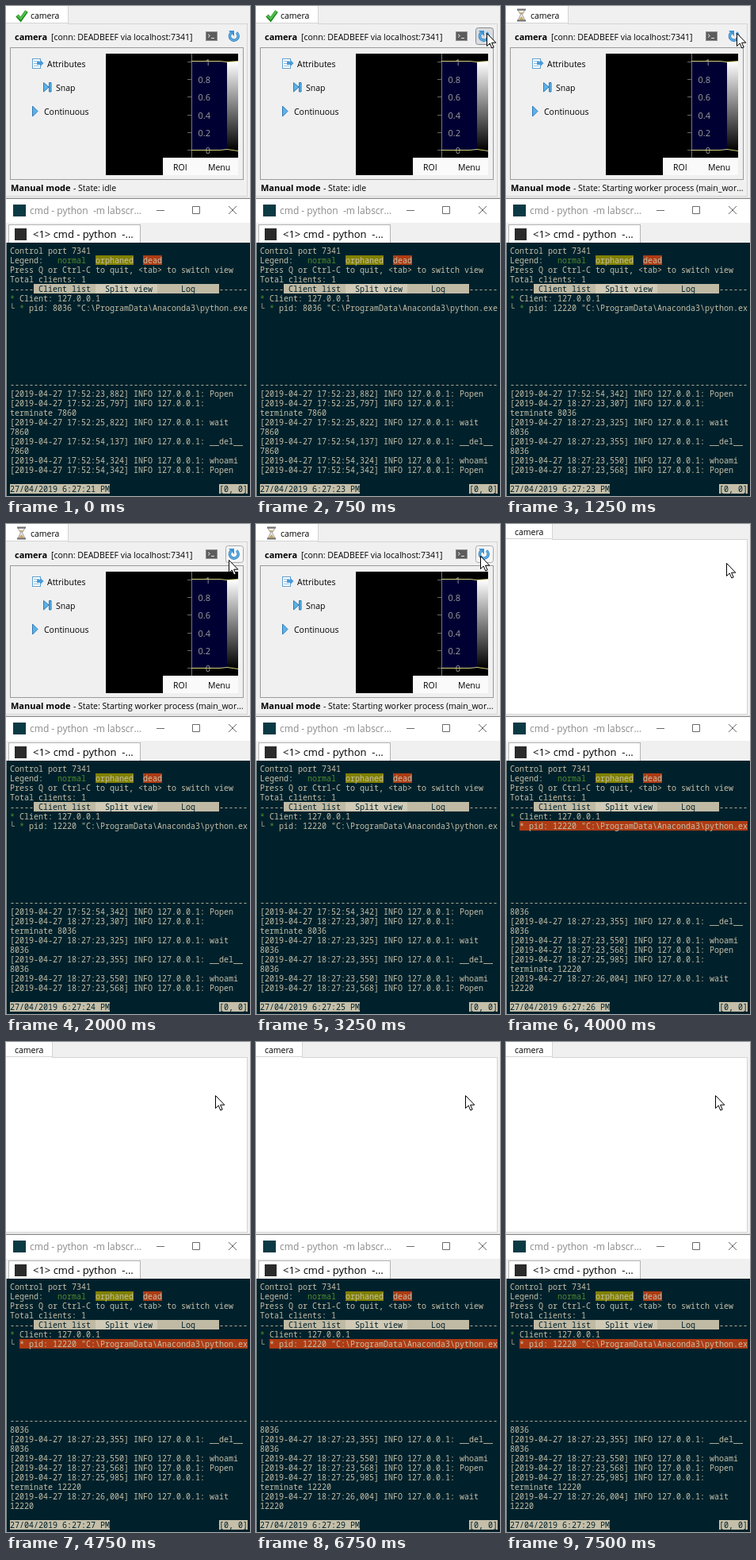
Write an HTML page with a canvas that moves like this. It is 308 by 617 pixels and loops after 8 s.

```html
<!DOCTYPE html>
<html>
<head>
<meta charset="utf-8">
<style>
  html, body { margin: 0; width: 100%; height: 100%; overflow: hidden; }
  canvas { display: block; }
</style>
</head>
<body>
<canvas id="stage" width="308" height="617"></canvas>
<script>
const ctx = document.getElementById('stage').getContext('2d');
const LOOP = 8000;
const SANS = '"Open Sans", "Noto Sans", sans-serif';
const MONO = '10px "Noto Sans Mono", "Liberation Mono", monospace';
const TERM_BG = '#00212b', TERM_FG = '#c5bfa9', GREEN = '#4f8a2c', RED = '#ad3c14';

// Step tracks: [start time, value...]
const CURSOR = [[0, -50, -50], [250, 297, 32], [500, 291, 34], [1750, 287, 33], [2000, 281, 45],
  [2250, 272, 61], [3000, 276, 43], [3250, 283, 40], [4000, 278, 49], [4250, 274, 56],
  [4500, 264, 64], [4750, 264, 67]];
const BUTTON = [[0, ''], [250, 'hover'], [750, 'pressed'], [1000, ''], [1750, 'hover'], [2250, ''], [3250, 'hover']];
const SECONDS = [[0, 21], [250, 22], [750, 23], [1750, 24], [2750, 25], [3750, 26], [4750, 27], [5750, 28], [6750, 29]];
const LOG_START = [[0, 0], [1250, 8], [3750, 12]];

const entry = (time, text) => `[2019-04-27 ${time}] INFO 127.0.0.1: ${text}`;
const LOG = [
  entry('17:52:23,882', 'Popen'),
  entry('17:52:25,797', ''), 'terminate 7860',
  entry('17:52:25,822', 'wait'), '7860',
  entry('17:52:54,137', '__del__'), '7860',
  entry('17:52:54,324', 'whoami'),
  entry('17:52:54,342', 'Popen'),
  entry('18:27:23,307', ''), 'terminate 8036',
  entry('18:27:23,325', 'wait'), '8036',
  entry('18:27:23,355', '__del__'), '8036',
  entry('18:27:23,550', 'whoami'),
  entry('18:27:23,568', 'Popen'),
  entry('18:27:25,985', ''), 'terminate 12220',
  entry('18:27:26,004', 'wait'), '12220'
];

const at = (track, t) => track.filter(step => step[0] <= t).pop().slice(1);

function rect(x, y, w, h, fill, stroke) {
  ctx.fillStyle = fill;
  ctx.fillRect(x, y, w, h);
  if (stroke) {
    ctx.strokeStyle = stroke;
    ctx.lineWidth = 1;
    ctx.strokeRect(x + .5, y + .5, w - 1, h - 1);
  }
}

function text(str, x, y, size = 10.5, color = '#000', weight = '') {
  ctx.font = `${weight} ${size}px ${SANS}`;
  ctx.fillStyle = color;
  ctx.fillText(str, x, y);
}

function path(d, { fill, stroke, width = 1, x = 0, y = 0 }) {
  const shape = new Path2D(d);
  ctx.save();
  ctx.translate(x, y);
  if (fill) { ctx.fillStyle = fill; ctx.fill(shape); }
  if (stroke) { ctx.strokeStyle = stroke; ctx.lineWidth = width; ctx.stroke(shape); }
  ctx.restore();
}

// Terminal text on a 6 x 12 character grid
function cell(str, col, row, color = TERM_FG, bg) {
  const x = 5 + col * 6, y = 302 + row * 12;
  if (bg) rect(x, y, str.length * 6, 12, bg);
  ctx.font = MONO;
  ctx.fillStyle = color;
  ctx.fillText(str, x, y + 9.5);
}

function verticalGradient(y0, y1, from, to) {
  const g = ctx.createLinearGradient(0, y0, 0, y1);
  g.addColorStop(0, from);
  g.addColorStop(1, to);
  return g;
}

function tabPanel(tabWidth, top, fill) {
  rect(0, 0, 308, 244, '#f0f0f0');
  rect(-1, top, 306, 240 - top, fill, '#d4d4d4');
  rect(-1, -1, tabWidth + 1, top + 1, '#fff', '#d4d4d4');
  rect(0, top, tabWidth - 1, 1, fill);
}

function tabIcon(busy) {
  if (!busy) {
    path('M14 12 L18.5 17 L26 6.5', { stroke: '#1f8a1f', width: 4.4 });
    path('M14.5 12 L18.5 16 L25.5 6.5', { stroke: '#4fc04a', width: 2.4 });
    return;
  }
  path('M15 5 H24 L20.5 11 L24 18 H15 L18.5 11 Z', { fill: '#f2f2f2', stroke: '#999' });
  path('M17 8 H22 L19.5 11 Z M16 17.5 L19.5 13 L23 17.5 Z', { fill: '#c9a665' });
  path('M14 4.5 H25 M14 18.5 H25', { stroke: '#6f6f6f', width: 2 });
}

function refreshButton(state) {
  if (state) {
    ctx.beginPath();
    ctx.roundRect(277.5, 27.5, 22, 21, 3);
    ctx.fillStyle = state === 'pressed' ? '#d9dde2' : '#f6f6f6';
    ctx.fill();
    ctx.strokeStyle = state === 'pressed' ? '#8c8c8c' : '#a9a9a9';
    ctx.lineWidth = 1;
    ctx.stroke();
  }
  path('M284 34 A5.4 5.4 0 1 0 291 33.5', { stroke: '#2f7fc0', width: 3.4 });
  path('M284 34 A5.4 5.4 0 1 0 291 33.5', { stroke: '#63b2e6', width: 1.6 });
  path('M281 31 H288 V38 Z', { fill: '#3c93d2' });
}

function plot() {
  rect(126, 60, 167, 153, '#000');
  rect(235, 70, 44, 112, '#000032');
  rect(279, 70, 14, 112, verticalGradient(70, 182, '#fff', '#000'));
  rect(234, 60, 1, 131, '#777');
  ctx.textAlign = 'right';
  ['1', '0.8', '0.6', '0.4', '0.2', '0'].forEach((label, i) => {
    const y = 70 + i * 22.2;
    text(label, 258, y + 5, 11, '#a0a0a0');
    rect(229, Math.round(y), 5, 1, '#666');
  });
  ctx.textAlign = 'left';
  path('M234 69.5 H270 L279 70.5 L293 69.5 M234 181.5 H270 L279 180.5 L293 182.5', { stroke: '#d0d078' });
  rect(198, 191, 95, 22, '#fafafa');
  text('ROI', 211, 207);
  text('Menu', 255, 207);
}

function cameraWindow(busy, button) {
  tabPanel(79, 22, '#f0f0f0');
  tabIcon(busy);
  text('camera', 31, 16);
  text('camera', 11, 43, 11, '#000', 'bold');
  text('[conn: DEADBEEF via localhost:7341]', 57, 43);

  rect(252, 32, 15, 12, '#5c5c5c', '#8d8d8d');
  path('M255 35.5 L257.5 37.5 L255 39.5 M259 40.5 H263', { stroke: '#e4e4e4' });
  refreshButton(button);

  rect(5, 52, 295, 167, '#f0f0f0', '#9a9a9a');
  rect(33, 66, 11, 13, '#fff', '#5f9fd0');
  path('M35 69.5 H42 M35 72.5 H42 M35 75.5 H42', { stroke: '#8ebbe0' });
  path('M39 70 H43 V67.5 L47.5 72 L43 76.5 V74 H39 Z', { fill: '#4a9bd8' });
  text('Attributes', 52, 77);
  path('M47.5 96.5 L54 102 L47.5 108 Z M54.5 96.5 H57 V108 H54.5 Z', { fill: '#5db3e8', stroke: '#2d79b5' });
  text('Snap', 63, 107);
  path('M33.5 126 L40 132.5 L33.5 139 Z', { fill: '#5db3e8', stroke: '#2d79b5' });
  text('Continuous', 48, 137);
  plot();

  text('Manual mode', 6, 233, 11, '#000', 'bold');
  text('- State: ' + (busy ? 'Starting worker process (main_wor...' : 'idle'), 85, 233);
}

function closedWindow() {
  tabPanel(59, 19, '#fff');
  text('camera', 11, 14);
}

function consoleFrame() {
  rect(0, 241, 308, 3, '#d8d8d8');
  rect(0, 242, 308, 1, '#8a8a8a');
  rect(0, 243, 308, 30, '#fff');
  rect(9, 250, 16, 15, '#0b3a44');
  text('cmd - python  -m labscr...', 30, 262, 12, '#8a8a8a');
  path('M190 257.5 H200 M235.5 252.5 H244.5 V261.5 H235.5 Z M281 252 L291 262 M291 252 L281 262', { stroke: '#6a6a6a' });
  rect(0, 273, 308, 25, '#f0f0f0');
  rect(3, 275, 167, 24, '#fff', '#b4b4b4');
  rect(11, 280, 15, 15, '#2b2b2b');
  text('<1> cmd - python  -...', 34, 292, 13);
}

function terminal(pid, dead, logStart, seconds) {
  rect(0, 298, 308, 319, TERM_BG);
  rect(0, 298, 1, 319, '#8a9090');
  cell('Control port 7341', 0, 0);
  cell('Legend:', 0, 1);
  cell('normal', 10, 1, GREEN);
  cell('orphaned', 18, 1, TERM_FG, '#808000');
  cell('dead', 28, 1, TERM_FG, RED);
  cell('Press Q or Ctrl-C to quit, <tab> to switch view', 0, 2);
  cell('Total clients: 1', 0, 3);
  cell('-----', 0, 4);
  cell(' Client list ', 5, 4, TERM_BG, '#c0baa4');
  cell('  Split view ', 18, 4, TERM_BG, '#d0cab6');
  cell('     Log     ', 31, 4, TERM_BG, '#c0baa4');
  cell('------', 44, 4);
  cell('*', 0, 5, GREEN);
  cell('Client: 127.0.0.1', 2, 5);

  const client = `* pid: ${pid} "C:\\ProgramData\\Anaconda3\\python.exe`.slice(0, 48);
  cell('└', 0, 6);
  cell(client, 2, 6, TERM_FG, dead && RED);
  if (!dead) {
    rect(17, 374, 6, 12, TERM_BG);
    cell('*', 2, 6, GREEN);
  }

  cell('-'.repeat(50), 0, 14);
  LOG.slice(logStart, logStart + 9).forEach((line, i) => cell(line, 0, 15 + i));
  cell(`27/04/2019 6:27:${seconds} PM`, 0, 25, TERM_BG, TERM_FG);
  cell('[0, 0]', 44, 25, TERM_BG, TERM_FG);
}

function draw(t) {
  if (t < 3500) cameraWindow(t >= 1000, at(BUTTON, t)[0]);
  else closedWindow();
  consoleFrame();
  terminal(t < 1250 ? 8036 : 12220, t >= 3750, at(LOG_START, t)[0], at(SECONDS, t)[0]);
  const [x, y] = at(CURSOR, t);
  path('M.5 .5 V16.5 L4.2 13 L6.8 19 L9.2 18 L6.6 12.2 H11.8 Z', { fill: '#fff', stroke: '#000', x, y });
}

function frame() {
  draw(performance.now() % LOOP);
  requestAnimationFrame(frame);
}
frame();
</script>
</body>
</html>
```
